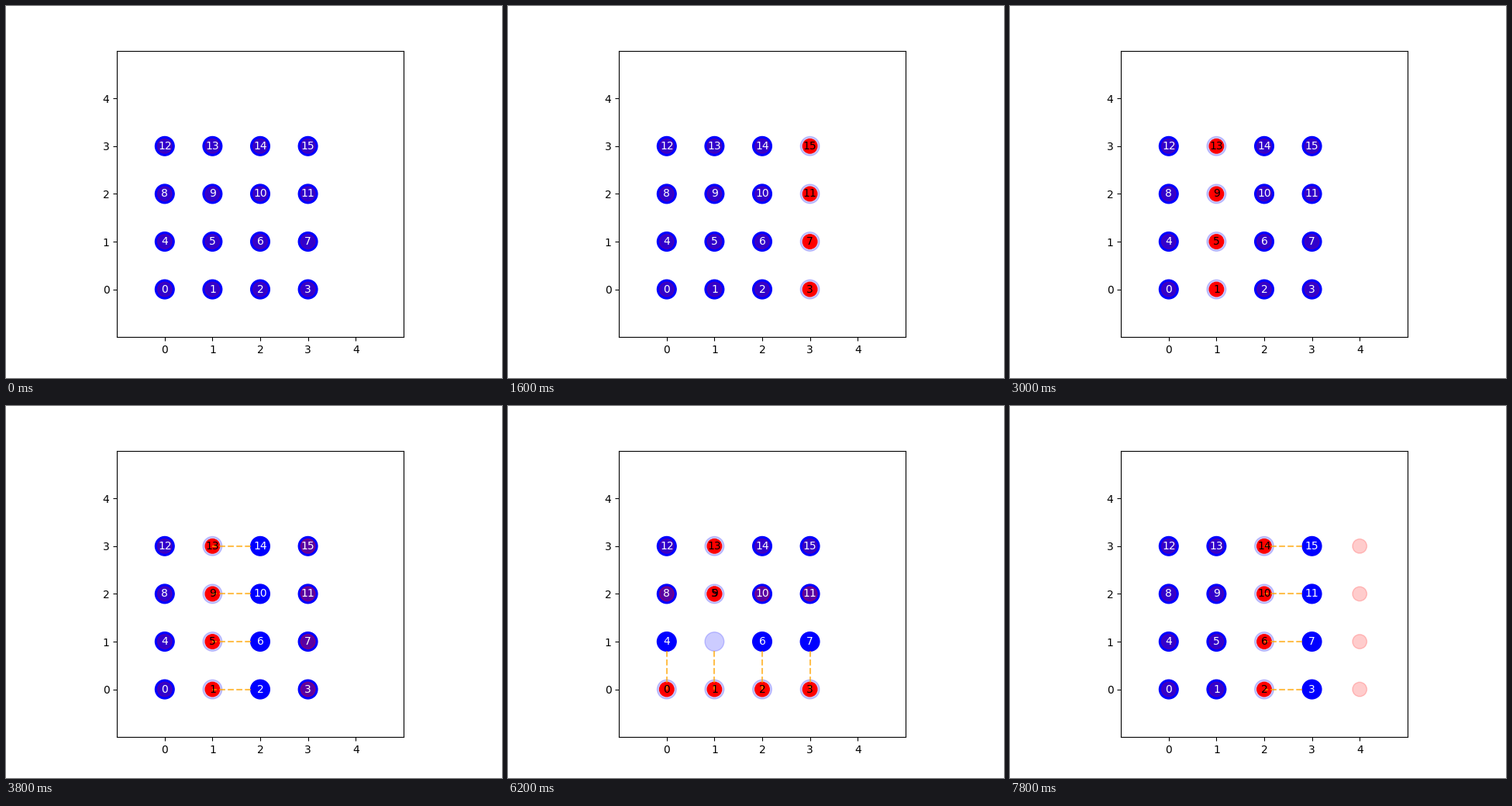
Animation of 640x480 px, one loop 8 s. Source, as a matplotlib script:

```python
import numpy as np
import matplotlib.pyplot as plt
from matplotlib.animation import FuncAnimation
from matplotlib.patches import Circle

SIZE = 4
FRAMES = 40
GAP = 0.2
COL, ROW = 0, 1
CELLS = [(c, r) for r in range(SIZE) for c in range(SIZE)]


def approach(axis, i, j):
    """Clear the trap line at j, then bring line i next to it."""
    d = np.sign(j - i)
    return [("shift", axis, j, j + d), ("shift", axis, i, j - GAP * d)]


def retreat(axis, i, j):
    return [("shift", axis, i, i), ("shift", axis, j, j), ("drop",)]


def gate(axis, i, j, wait=1):
    return ([("lift", axis, i)] + approach(axis, i, j)
            + [("hold",)] * wait + retreat(axis, i, j))


steps = (gate(COL, 0, 1) + gate(COL, 3, 2) + gate(COL, 1, 2)
         + [("lift", COL, 1)] + gate(ROW, 0, 1, wait=5)
         + [("hold",)] + gate(COL, 2, 3))


def build_states():
    pos = np.array([np.arange(SIZE, dtype=float)] * 2)
    lifted = np.zeros((SIZE, SIZE), bool)
    old = pos.copy()
    states = [(pos.copy(), old, lifted.copy())]
    for kind, *args in steps[:FRAMES - 1]:
        if kind != "hold":
            old = pos.copy()
        if kind == "lift":
            axis, i = args
            if axis == COL:
                lifted[i, :] = True
            else:
                lifted[:, i] = True
        elif kind == "drop":
            lifted[:] = False
        elif kind == "shift":
            axis, i, to = args
            pos[axis, i] = to
        states.append((pos.copy(), old, lifted.copy()))
    return states


states = build_states()

fig, ax = plt.subplots(figsize=(6.4, 4.8), dpi=100)
ax.set_aspect("equal")
ax.set_xlim(-1, SIZE + 1)
ax.set_ylim(-1, SIZE + 1)
ax.set_xticks(range(SIZE + 1))
ax.set_yticks(range(SIZE + 1))

sites = [ax.add_patch(Circle(cell, 0.2, color="blue")) for cell in CELLS]
traps = [ax.add_patch(Circle(cell, 0.15, color="red")) for cell in CELLS]
paths = [ax.plot([], [], "--", color="orange", alpha=0.7)[0] for _ in CELLS]
labels = [ax.text(c, r, str(k), ha="center", va="center")
          for k, (c, r) in enumerate(CELLS)]


def draw(n):
    pos, old, lifted = states[n]
    for k, (c, r) in enumerate(CELLS):
        up = lifted[c, r]
        x, y = pos[COL, c], pos[ROW, r]
        x0, y0 = old[COL, c], old[ROW, r]
        sites[k].set_alpha(0.2 if up else 1)
        traps[k].set_center((x, y))
        traps[k].set_alpha(1 if up else 0.2)
        labels[k].set_position((x, y) if up else (c, r))
        labels[k].set_color("black" if up else "white")
        if (x, y) != (x0, y0):
            paths[k].set_data([x0, x], [y0, y])
        else:
            paths[k].set_data([], [])
    return sites + traps + paths + labels


anim = FuncAnimation(fig, draw, frames=FRAMES, interval=200,
                     repeat=True, repeat_delay=0, blit=False)
plt.show()
```
